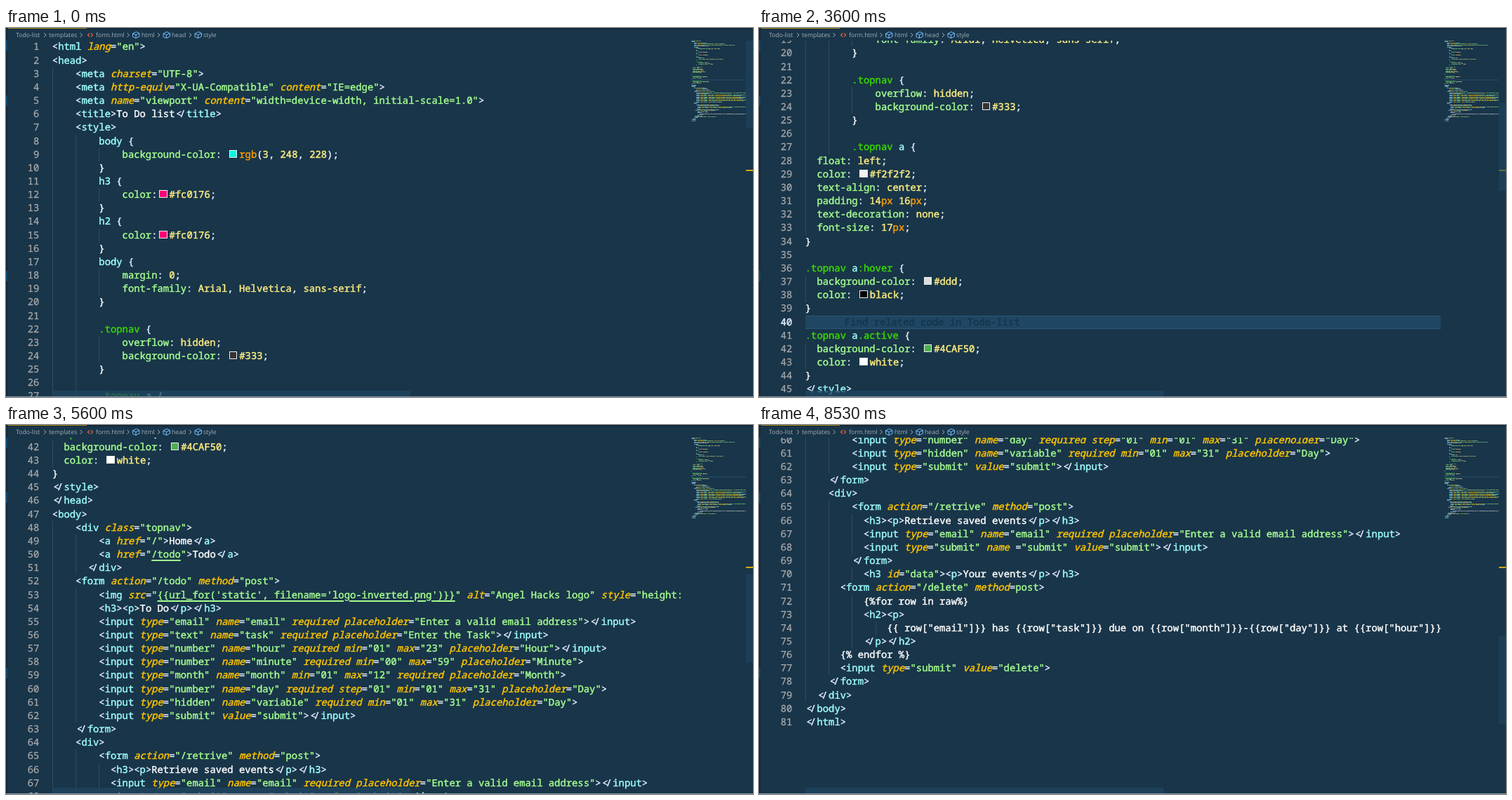
Write an HTML page that moves like this. It is 1064 px wide and 526 px high and loops after 9870 ms.

```html
<!DOCTYPE html>
<html lang="en">
<head>
<meta charset="utf-8">
<style>
html, body { margin: 0; width: 100%; height: 100%; overflow: hidden; background: #193549; }
#stage { position: relative; width: 1064px; height: 526px; overflow: hidden; text-rendering: geometricPrecision; }
#stage > * { position: absolute; }
#top { left: 0; top: 0; width: 1064px; height: 2px; background: #122738; }
#tab { left: 3px; top: 0; width: 112px; height: 1px; background: #a58a14; }
#side { left: 0; top: 0; width: 2px; height: 526px; background: #122738; }
.mark { left: 0; width: 2px; height: 15px; background: #0d4570; }
#crumbs { left: 0; top: 2px; }
#crumbs text { font: 8.7px "Open Sans", "Noto Sans", sans-serif; fill: #a3afb8; }
#crumbs path { fill: none; stroke: #a3afb8; }
#crumbs .cube { stroke: #75beff; }
#crumbs .file { stroke: #e8603c; stroke-width: 1.2; }
#editor { left: 0; top: 18px; width: 971px; height: 508px; overflow: hidden; }
#map { left: 972px; top: 18px; width: 82px; height: 508px; overflow: hidden; }
.code { position: absolute; left: 0; top: -.6px; width: 1064px; white-space: pre; color: #fff;
  font: 500 13.86px/19.1667px "Noto Sans Mono", "DejaVu Sans Mono", monospace; font-variant-ligatures: none;
  -webkit-text-stroke: .45px currentColor; }
.line { position: relative; height: 19.1667px; padding-left: 65.8px; }
.line > * { position: relative; }
.line > .n { position: absolute; left: 0; width: 47.4px; text-align: right; color: #aaa; -webkit-text-stroke-width: .25px; }
.line > .guide { position: absolute; top: 0; width: 1px; height: 100%; background: #3b5364; opacity: .75; }
.line.now::before { content: ""; position: absolute; left: 66px; top: 0; right: 0; height: 100%;
  box-sizing: border-box; background: #1f4662; border: 1px solid #28567a; border-width: 1px 0; }
.line.now > .n { color: #e1efff; -webkit-text-stroke-width: .5px; }
.line > .ghost { position: absolute; left: 122px; color: #15354e; }
.p { color: #e1efff; } .t { color: #9effff; } .a { color: #ffc600; font-style: italic; }
.s { color: #a5ff90; } .v { color: #ffee80; } .o { color: #ff9d00; } .c { color: #3ad900; }
.line > .l { left: 1.7px; } .line > .r { left: -1.5px; }
.s u { text-underline-offset: 3px; text-decoration-thickness: 1.5px; }
.sw { display: inline-block; box-sizing: border-box; width: 11.33px; height: 11.33px; margin: 0 2.83px;
  border: 1.4px solid #eee; vertical-align: -.3px; }
#map .code { left: -1.6px; top: 0; transform: scale(.1, .0741); transform-origin: 0 0; -webkit-text-stroke-width: 2px; }
#map .n, #map .guide, #map .ghost { display: none; }
#thumb { position: absolute; left: 0; width: 82px; height: 38px; background: #1f466240; }
#ruler { left: 1054px; top: 202px; width: 10px; height: 2px; background: #d2a90c; }
#vbar { left: 1054px; width: 10px; height: 125px; background: #1f466299; }
#hbar { left: 66px; top: 517px; width: 510px; height: 8px; background: #1f4662b8; }
#foot { left: 0; top: 525px; width: 1064px; height: 1px; background: #7f97a6; }
</style>
</head>
<body>
<div id="stage">
  <div id="editor"><div class="code" id="code"></div></div>
  <div id="map"><div id="thumb"></div></div>
  <div id="ruler"></div><div id="vbar"></div><div id="hbar"></div>
  <svg id="crumbs" width="320" height="16"></svg>
  <div id="top"></div><div id="tab"></div><div id="side"></div><div id="foot"></div>
  <div class="mark" style="top:18px"></div>
  <div class="mark" style="top:96px"></div>
  <div class="mark" style="top:346px"></div>
</div>
<script type="text/plain" id="text"><html lang="en">
<head>
    <meta charset="UTF-8">
    <meta http-equiv="X-UA-Compatible" content="IE=edge">
    <meta name="viewport" content="width=device-width, initial-scale=1.0">
    <title>To Do list</title>
    <style>
        body {
            background-color: rgb(3, 248, 228);
        }
        h3 {
            color:#fc0176;
        }
        h2 {
            color:#fc0176;
        }
        body {
            margin: 0;
            font-family: Arial, Helvetica, sans-serif;
        }

        .topnav {
            overflow: hidden;
            background-color: #333;
        }

        .topnav a {
  float: left;
  color: #f2f2f2;
  text-align: center;
  padding: 14px 16px;
  text-decoration: none;
  font-size: 17px;
}

.topnav a:hover {
  background-color: #ddd;
  color: black;
}

.topnav a.active {
  background-color: #4CAF50;
  color: white;
}
</style>
</head>
<body>
    <div class="topnav">
        <a href="/">Home</a>
        <a href="/todo">Todo</a>
      </div>
    <form action="/todo" method="post">
        <img src="{{url_for('static', filename='logo-inverted.png')}}" alt="Angel Hacks logo" style="height: 100px; width: 100px">
        <h3><p>To Do</p></h3>
        <input type="email" name="email" required placeholder="Enter a valid email address"></input>
        <input type="text" name="task" required placeholder="Enter the Task"></input>
        <input type="number" name="hour" required min="01" max="23" placeholder="Hour"></input>
        <input type="number" name="minute" required min="00" max="59" placeholder="Minute">
        <input type="month" name="month" min="01" max="12" required placeholder="Month">
        <input type="number" name="day" required step="01" min="01" max="31" placeholder="Day">
        <input type="hidden" name="variable" required min="01" max="31" placeholder="Day">
        <input type="submit" value="submit"></input>
    </form>
    <div>
        <form action="/retrive" method="post">
          <h3><p>Retrieve saved events</p></h3>
          <input type="email" name="email" required placeholder="Enter a valid email address"></input>
          <input type="submit" name ="submit" value="submit"></input>
        </form>
          <h3 id="data"><p>Your events</p></h3>
      <form action="/delete" method=post>
          {%for row in raw%}
          <h2><p>
              {{ row["email"]}} has {{row["task"]}} due on {{row["month"]}}-{{row["day"]}} at {{row["hour"]}}:{{row["minute"]}}
          </p></h2>
      {% endfor %}
      <input type="submit" value="delete">
    </form>
  </div>
</body>
</html></script>
<script>
const $ = id => document.getElementById(id);
const esc = s => s.replace(/</g, '&lt;');
const span = (cls, s) => `<span class="${cls}">${esc(s)}</span>`;

function tag(s) {
  let attr = '';
  return s.replace(/^(<\/?)(\w+)|("[^"]*")|(?<==)(\w+)|([\w-]+)|([=>])/g, (m, open, name, str, bare, key, punct) => {
    if (open) return (open[1] ? span('p l', '<') + span('p r', '/') : span('p', '<')) + span('t', name);
    if (str) {
      const link = /href|src/.test(attr) && str.length > 3;
      return link ? `<span class="s">"<u>${str.slice(1, -1)}</u>"</span>` : span('s', str);
    }
    if (bare) return span('s', bare);
    if (key) return span('a', attr = key);
    return span('p', punct);
  });
}
const html = s => s.split(/(<[^>]*>?)/).map(x => x[0] === '<' ? tag(x) : x).join('');

function css(s) {
  if (s.endsWith('{'))
    return s.replace(/([.:]\w+)|(\w+)|{/g, (m, cls, el) => span(cls ? 'c' : el ? 't' : 'p', m));
  const rule = s.match(/^(\s*)([\w-]+)(:\s*)(.*);$/);
  if (!rule) return s;
  const [, pad, prop, colon, val] = rule;
  const swatch = /^(rgb|#|black|white)/.test(val) ? `<span class="sw" style="background:${val}"></span>` : '';
  const value = val.replace(/(px|rgb)|([(),])|[\w#-]+?(?=px|[(), ]|$)/g,
    (m, word, punct) => span(word ? 'o' : punct ? 'p' : 'v', m));
  return pad + span('s', prop) + span('p', colon) + swatch + value + span('p', ';');
}

let indent = 0;
$('code').innerHTML = $('text').textContent.split('\n').map((s, i) => {
  const n = i + 1;
  if (s) indent = s.search(/\S/);
  let out = `<span class="n">${n}</span>`;
  for (let c = 0; c < indent; c += 4) out += `<i class="guide" style="left:${66 + c * 8.31}px"></i>`;
  out += n > 7 && n < 45 ? css(s) : html(s);
  if (n === 40) out += '<span class="ghost">Find related code in Todo-list</span>';
  return `<div class="line${n === 40 ? ' now' : ''}">${out}</div>`;
}).join('');

const mini = $('code').cloneNode(true);
mini.removeAttribute('id');
$('map').append(mini);

const label = (x, s) => `<text x="${x}" y="11">${s}</text>`;
const arrow = x => `<path d="M${x} 5l3 3l-3 3"/>`;
const cube = x => `<path class="cube" d="M${x} 6l5-2.5l4.5 2v4.5l-5 2.5l-4.5-2zl4.5 2l5-2.5m-5 2.5v4.5"/>`;
$('crumbs').innerHTML = label(14, 'Todo-list') + label(61, 'templates') + label(128, 'form.html') +
  label(193, 'html') + label(236, 'head') + label(281, 'style') +
  [54, 105.5, 172.5, 216, 261].map(arrow).join('') + [180.5, 224, 269].map(cube).join('') +
  '<path class="file" d="M119 5.5l-2.5 2.5l2.5 2.5m2-5l2.5 2.5l-2.5 2.5"/>';

// Each wheel notch scrolls the editor by the same amount.
const notches = [470, 800, 1130, 1470, 1800, 2270, 2800, 2870, 3200, 3600, 3670, 4000, 4070, 4400,
  4600, 4670, 4730, 4930, 5000, 5070, 5530, 5600, 6270, 6530, 6600, 6670, 7000, 7200,
  7870, 7930, 8000, 8400];
const NOTCH = 35.5, LOOP = 9870;
const clamp = x => Math.max(0, Math.min(1, x));
const fade = (t, from, to) => clamp((t - from) / 100) * clamp((to - t) / 100);

function draw(now) {
  const t = now % LOOP;
  const n = notches.filter(at => at <= t + .5).length;
  $('code').style.transform = `translateY(${-n * NOTCH}px)`;
  $('vbar').style.top = 18 + n * 8.85 + 'px';
  $('thumb').style.top = n * NOTCH * .0741 + 'px';
  $('thumb').style.opacity = fade(t, 6500, 7760) + fade(t, 7850, 8530);
  requestAnimationFrame(draw);
}
draw(0);
</script>
</body>
</html>
```
